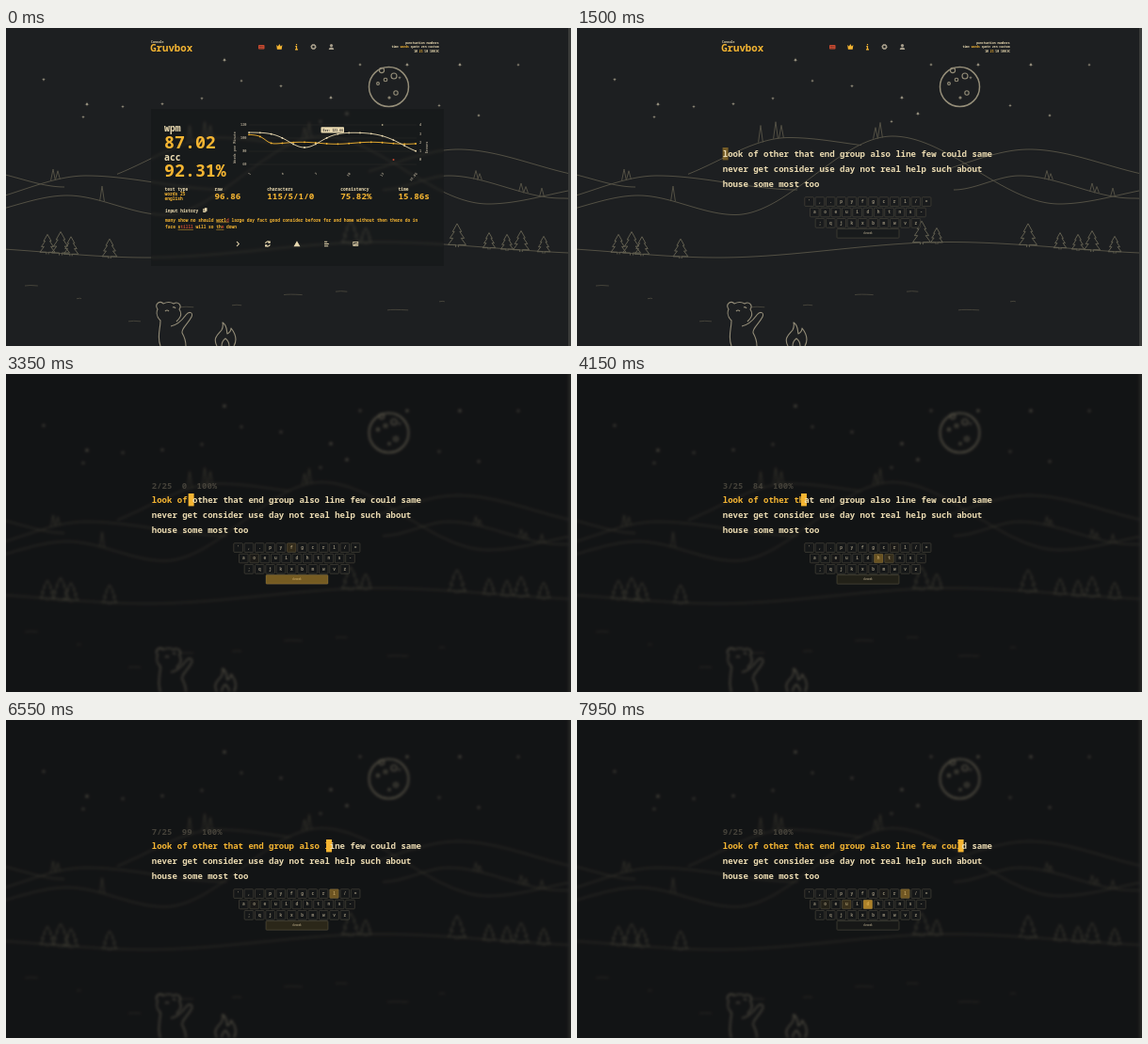
Recreate the animation shown at these times as an HTML page. Size 600x338 px, loop 8 s.

```html
<!DOCTYPE html>
<html lang="en">
<head>
<meta charset="utf-8">
<title>Typing test</title>
<style>
  html, body { margin: 0; width: 100%; height: 100%; overflow: hidden; background: #1d1f21; }
  svg { position: absolute; left: 0; top: 0; width: 600px; height: 338px; }
  text { font-family: "Noto Sans Mono", "DejaVu Sans Mono", monospace; font-weight: 700; white-space: pre; }
  #panel { position: absolute; left: 154px; top: 86px; width: 311px; height: 167px;
    background: rgba(18, 20, 20, .42); backdrop-filter: blur(1.5px); }
</style>
</head>
<body>
<svg viewBox="0 0 600 338"><g id="scene"></g></svg>
<div id="panel"></div>
<svg viewBox="0 0 600 338">
  <g id="header"></g>
  <g id="results"></g>
  <g id="test"></g>
</svg>
<script>
const LOOP = 8000, CHAR = 5.4, LEFT = 154.8;
const CREAM = '#ebdbb2', MAIN = '#f5b532', RED = '#c94a30', GREY = '#a89f8c';
const $ = id => document.getElementById(id);
const ease = v => { v = Math.max(0, Math.min(1, v)); return v * v * (3 - 2 * v); };
const ramp = (t, from, length) => ease((t - from) / length);
const repeat = (n, make) => Array.from({ length: n }, (_, i) => make(i)).join('');

let seed = 11;
const random = (low, high) => {
  seed = seed * 16807 % 2147483647;
  return low + (high - low) * seed / 2147483647;
};

const text = (x, y, size, str, fill = CREAM, extra = '') =>
  `<text x="${x}" y="${y}" font-size="${size}" fill="${fill}" ${extra}>${str}</text>`;
const rect = (x, y, w, h, extra) => `<rect x="${x}" y="${y}" width="${w}" height="${h}" ${extra}/>`;
const circle = (x, y, r, extra = '') => `<circle cx="${x}" cy="${y}" r="${r}" ${extra}/>`;
const path = (d, extra = '') => `<path d="${d}" ${extra}/>`;
const curve = (from, to, step, f) => {
  let d = '';
  for (let x = from; x <= to; x += step) d += `${d ? 'L' : 'M'}${x} ${f(x).toFixed(2)}`;
  return d;
};

// Scenery: each ridge runs smoothly through its crests and dips
const ridges = [
  { points: [[-30, 152], [62, 169]] },
  { points: [[-50, 187], [85, 157], [235, 172]], spikes: [50, 55], height: 12 },
  { points: [[75, 165], [225, 116.5], [345, 128]], from: 118, to: 302, spikes: [211, 217, 195], height: 18 },
  { points: [[-50, 200], [65, 178], [168, 198.5], [335, 115], [512, 187], [640, 168]], spikes: [102, 317, 322], height: 16 },
  { points: [[340, 160], [480, 129], [640, 160]], from: 385 },
  { points: [[400, 172], [470, 157], [590, 181], [640, 184]], spikes: [499, 503, 547, 552, 569], height: 9 },
  { points: [[-60, 233], [150, 244], [395, 227.5], [640, 240]], pines: [44, 58, 69, 110, 366, 382, 479, 513, 532, 547, 571] }
];
const ridgeY = points => x => {
  const i = Math.max(1, points.findIndex(p => p[0] >= x)), [x0, y0] = points[i - 1], [x1, y1] = points[i];
  return y0 + (y1 - y0) * ramp(x, x0, x1 - x0);
};
const pine = (x, base, h) => {
  const half = s => [[0, 1], [.5, .66], [.3, .66], [.8, .38], [.45, .38], [1, .1], [.15, .1], [.15, 0]]
    .map(([w, up]) => `${x + s * w * h * .38} ${base - up * h}`).join('L');
  return path(`M${half(1)}M${half(-1)}`, 'stroke="#625f50"');
};
const spike = (x, base, h) => path(`M${x - 2.4} ${base}L${x} ${base - h}L${x + 2.4} ${base}`);
const ridge = ({ points, from = points[0][0], to = points.at(-1)[0], spikes = [], height, pines = [] }) => {
  const y = ridgeY(points);
  return path(curve(from, to, 2, y)) +
    spikes.map((x, i) => spike(x, y(x), height * (i % 2 ? .75 : 1))).join('') +
    pines.map(x => pine(x, y(x) + 2, 21 + 4 * Math.sin(x))).join('');
};
const star = (x, y, r) =>
  path(`M${x - r} ${y}Q${x} ${y} ${x} ${y - r}Q${x} ${y} ${x + r} ${y}Q${x} ${y} ${x} ${y + r}Q${x} ${y} ${x - r} ${y}Z`);
const brightStars = [[232, 34], [86, 81], [362, 91], [426, 39], [482, 39], [345, 74]];
const craters = [[412, 51], [399, 45], [414, 69], [403, 55], [395, 59], [407, 74]];

$('scene').innerHTML = rect(-30, -30, 660, 400, 'fill="#1d1f21"') +
  `<g fill="none" stroke="#535044" stroke-linejoin="round">
    ${ridges.map(ridge).join('')}
    ${repeat(9, i => path(`M${20 + 55 * i} ${random(274, 318)}q5 -1 ${random(4, 26)} 0`, 'stroke="#45433a"'))}
    <g stroke="#958e79" stroke-width="1.1">
      ${circle(406.5, 62.5, 21, 'stroke-width="1.5"')}${craters.map(([x, y], i) => circle(x, y, 3 - .4 * i)).join('')}
      ${path('M164 338C160 328 164 320 164 311C159 306 160 301 161 299C157 293 164 289 167 293Q173 290 178 293C183 290 187 295 184 299C188 305 184 309 181 312')}
      ${path('M175 317C184 315 188 309 191 305C195 300 199 303 197 307C193 315 186 319 187 324Q191 331 191 338M169 301q2 -2 4 0M177 297q2 -1 3 1')}
      ${path('M224 338C219 329 226 325 229 321Q231 317 230 313C235 316 234 321 235 325Q239 323 239 319C243 324 246 331 242 338M229 338Q229 333 233 330Q237 333 237 338')}
    </g>
  </g>
  <g fill="#a19a86">
    ${brightStars.map(([x, y]) => star(x, y, 2.8)).join('')}
    ${repeat(13, i => star(40 + 42 * i, random(38, 115), 1.9))}
  </g>` +
  rect(597, -30, 40, 400, 'fill="#3a3b39"');

// Header
const end = 'text-anchor="end"';
$('header').innerHTML = text(154, 16, 3.2, 'Console') + text(153.2, 25.4, 10.7, 'Gruvbox', MAIN) +
  rect(268, 18, 6.5, 4.6, `fill="${RED}" rx=".8"`) +
  path('M269.2 19.5h4M269.2 21.2h4', 'stroke="#1d1f21" stroke-width=".5" stroke-dasharray=".7 .4"') +
  path('M287.2 18l1.7 1.6L290.3 17l1.4 2.6L293.4 18l-.7 4.8h-4.8Z', `fill="${MAIN}"`) +
  path('M308.5 17v1.3M307.3 19.6h1.2v3M307 22.8h3', `fill="none" stroke="${MAIN}" stroke-width="1.2"`) +
  `<g fill="none" stroke="${GREY}">${circle(326.5, 20, 2, 'stroke-width="1.4"')}${circle(326.5, 20, 2.6, 'stroke-dasharray="1 1.04"')}</g>` +
  circle(345.5, 18.6, 1.6, `fill="${GREY}"`) + path('M342.8 23q0-2.5 2.7-2.5t2.7 2.5Z', `fill="${GREY}"`) +
  text(459.5, 16.5, 3.1, 'punctuation numbers', CREAM, end) +
  text(459.5, 21.2, 3.1, `time <tspan fill="${MAIN}">words</tspan> quote zen custom`, CREAM, end) +
  text(455.5, 25.9, 3.1, `10 <tspan fill="${MAIN}">25</tspan> 50 100`, CREAM, end) +
  path('M456.5 23l3 3M459.5 23l-3 3', `stroke="${CREAM}" stroke-width=".8"`);

// Results
const bump = (i, center, width, power = 2) => Math.exp(-(Math.abs((i - center) / width) ** power));
const rawSpeed = i => 111 + 16 * bump(i, 5, 2) + 22 * bump(i, 16, 3);
const netSpeed = i => 122.3 - 9 * bump(i, 0, 1.6, 4) + Math.sin(i);
const series = (f, color) => {
  const at = i => 258 + 11.8 * i;
  return path(curve(258, 436, 1, x => f((x - 258) / 11.8)), `fill="none" stroke="${color}" stroke-width=".9"`) +
    repeat(16, i => circle(at(i), f(i), .9, `fill="${color}"`));
};
const stat = (x, label, value) => text(x, 172.6, 4.6, label) + text(x, 182.2, 9.25, value, MAIN);
const bigStat = (y, label, value) => text(168, y, 9.8, label) + text(168, y + 17.4, 18.3, value, MAIN);
const wrong = (word, bad) => `<tspan text-decoration="underline ${RED}">${word}<tspan fill="${RED}">${bad}</tspan></tspan>`;
const turned = (x, y, angle, str, anchor) =>
  text(0, 0, 3.5, str, GREY, `text-anchor="${anchor}" transform="translate(${x} ${y}) rotate(${angle})"`);

$('results').innerHTML =
  bigStat(110.2, 'wpm', '87.02') + bigStat(140.5, 'acc', '92.31%') +
  text(168.5, 172.6, 4.6, 'test type') + text(168.5, 178, 4.6, 'words 25', MAIN) + text(168.5, 183.2, 4.6, 'english', MAIN) +
  stat(221.5, 'raw', '96.86') + stat(277.3, 'characters', '115/5/1/0') +
  stat(355.2, 'consistency', '75.82%') + stat(416.5, 'time', '15.86s') +
  repeat(4, i => text(255.5, 104.4 + 14 * i, 3.6, 120 - 20 * i, GREY, end) +
    path(`M258 ${103 + 14 * i}H436`, 'stroke="#2c2d2b" stroke-width=".5"')) +
  repeat(5, i => text(439, 104.4 + 9.2 * i, 3.6, 4 - i, GREY)) +
  repeat(6, i => turned(260 + 35.4 * i, 155, -50, i < 5 ? 1 + 3 * i : 15.86, 'end')) +
  turned(243.5, 127, -90, 'Words per Minute', 'middle') + turned(447.5, 127, -90, 'Errors', 'middle') +
  series(netSpeed, MAIN) + series(rawSpeed, CREAM) +
  circle(411.5, 140, 1, `fill="${RED}"`) + circle(399.7, 103, .8, `fill="${CREAM}"`) +
  rect(334.5, 105.3, 24.5, 6.3, `rx=".8" fill="${CREAM}"`) + text(336.5, 109.7, 3.3, 'Err: 121.66', '#3c3836') +
  text(169, 196.2, 4.5, 'input history') +
  rect(209.3, 192, 3, 4, `fill="${CREAM}"`) + rect(210.8, 191, 3, 4, `fill="${CREAM}" stroke="#17191a" stroke-width=".4"`) +
  text(169, 205.6, 4.53, `many show no should ${wrong('worl', 'd')} large day fact good consider before for and home without then there do in`, MAIN) +
  text(169, 213.4, 4.53, `face ${wrong('s', 'tilll')} will so ${wrong('th', 'e')} down`, MAIN) +
  `<g fill="none" stroke="${CREAM}" stroke-width="1.1">
    ${path('M245 227l2.3 2.5l-2.3 2.5')}
    ${path('M275.6 229a2.4 2.4 0 0 1 4.3-1.2M280.2 230a2.4 2.4 0 0 1-4.3 1.2M280.2 226.4v1.8h-1.8M275.6 232.6v-1.8h1.8')}
    ${path('M309 227.4l2.5 4.4h-5Z', `fill="${CREAM}"`)}
    ${path('M338 227.3h3.2M338 229.5h4.8M338 231.7h4.2')}
    ${rect(368.8, 227.4, 5, 4.2, 'stroke-width=".8"')}${path('M369.5 231l1.5-1.6l1 .8l1.2-1.2')}
  </g>`;

// Typing test
const LINES = ['look of other that end group also line few could same',
  'never get consider use day not real help such about', 'house some most too'];
const keyBoxes = {};
const keyLabel = (x, y, size, str) => text(x, y, size, str, '#958d78', 'text-anchor="middle"');
let labels = keyLabel(309, 219.2, 2.6, 'dvorak');
["',.pyfgcrl/=", 'aoeuidhtns-', ';qjkxbmwvz'].forEach((row, r) => [...row].forEach((key, i) => {
  const x = 246.6 + 5.7 * r + 11.32 * i, y = 184.6 + 11.4 * r;
  keyBoxes[key] = [x - 4.8, y - 4.8, 9.6, 9.6];
  labels += keyLabel(x, y + 1.4, 4.5, key);
}));
keyBoxes[' '] = [276, 213.6, 66, 9.6];
const boxes = Object.values(keyBoxes), keyNames = Object.keys(keyBoxes);

$('test').innerHTML = `<g id="stats">${repeat(3, i => text(LEFT, 121.8, 9, '', '#45423a', `id="stat${i}"`))}</g>` +
  rect(0, 127, 6, 13.4, `id="caret" fill="${MAIN}"`) +
  text(LEFT, 136.6, 9, `<tspan id="typed" fill="${MAIN}"></tspan><tspan id="rest"></tspan>`) +
  text(LEFT, 152.8, 9, LINES[1]) + text(LEFT, 169, 9, LINES[2]) +
  boxes.map(b => rect(...b, 'rx=".8" fill="#17191a" fill-opacity=".6" stroke="#48453b" stroke-width=".7"')).join('') + labels +
  boxes.map(b => rect(...b, `class="flash" rx=".8" fill="${MAIN}" opacity="0"`)).join('');
const flashes = [...document.querySelectorAll('.flash')];

// Typing rhythm: [characters typed, time], evenly spread in between
const START = 2380, LAG = 30;
const pace = [[1, START], [8, 3290], [16, 4075], [25, 5014], [34, 6330], [39, 7090], [47, 7885], [48, 7940]];
const presses = [START];
pace.slice(1).forEach(([n, time], i) => {
  const [n0, t0] = pace[i];
  for (let k = n0 + 1; k <= n; k++) presses.push(t0 + (time - t0) * (k - n0) / (n - n0));
});
const countAt = t => presses.filter(p => p <= t).length;

// The live speed is refreshed once a second
const speedAt = t => {
  const seconds = Math.floor((t - START) / 1000);
  if (seconds < 1) return 0;
  const done = LINES[0].slice(0, countAt(START + 1000 * seconds)).trimEnd();
  return Math.round(done.length / 5 * 60 / seconds);
};

function draw(t) {
  const focus = ramp(t, START, 170);
  $('scene').style.filter = focus ? `blur(${1.5 * focus}px) brightness(${1 - .37 * focus})` : 'none';
  $('header').style.opacity = 1 - ramp(t, START + 50, 220);
  $('results').style.opacity = $('panel').style.opacity = 1 - ramp(t, 1000, 125);
  $('test').style.opacity = ramp(t, 1125, 125);
  $('stats').style.opacity = focus;

  const count = countAt(t - LAG), typed = LINES[0].slice(0, count);
  $('typed').textContent = typed;
  $('rest').textContent = LINES[0].slice(count);

  const column = presses.reduce((sum, p) => sum + ramp(t, p + LAG, 100), 0);
  $('caret').setAttribute('x', LEFT - .2 + CHAR * column);
  $('caret').style.opacity = t < START ? .5 - .5 * Math.cos((t - 1280) / 1000 * 2 * Math.PI) : 1;

  let x = LEFT;
  [`${typed.split(' ').length - 1}/25`, `${speedAt(t)}`, '100%'].forEach((value, i) => {
    $('stat' + i).setAttribute('x', x);
    $('stat' + i).textContent = value;
    x += value.length * CHAR + 10.4;
  });

  flashes.forEach((flash, i) => {
    const last = presses.filter((p, n) => p <= t && LINES[0][n] === keyNames[i]).pop();
    const glow = last === undefined ? 0 : .75 * Math.exp((last - t) / 110);
    flash.setAttribute('opacity', glow < .01 ? 0 : glow);
  });
}

function frame() {
  draw(performance.now() % LOOP);
  requestAnimationFrame(frame);
}
frame();
</script>
</body>
</html>
```
